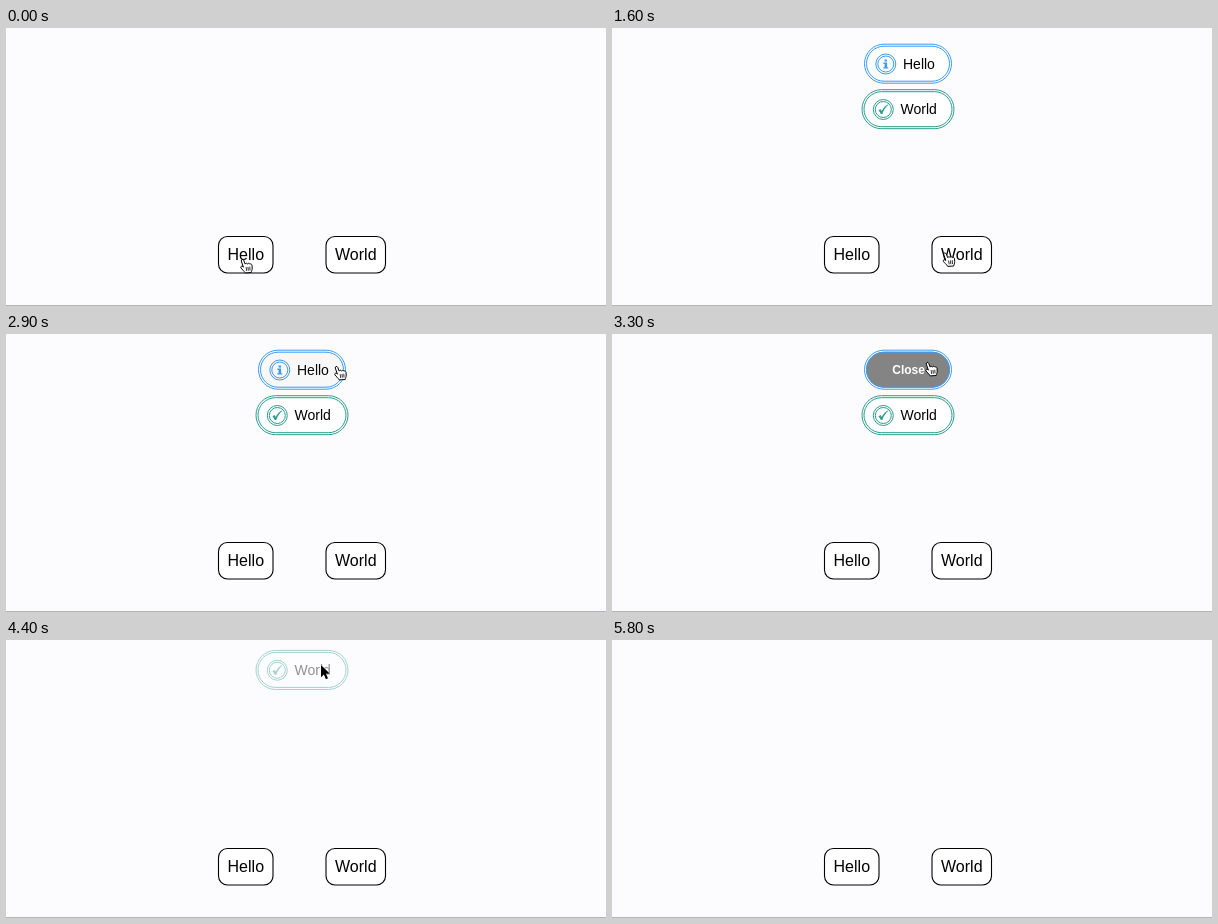
These frames come from a looping animation (600 px wide and 278 px high, 6.8 s). An HTML page:

```html
<!DOCTYPE html>
<html lang="en">
<head>
<meta charset="utf-8">
<title>Toast messages</title>
<style>
  html, body { margin: 0; width: 100%; height: 100%; overflow: hidden; background: #fcfbfe; }
  svg { display: block; width: 600px; height: 278px; font-family: "Liberation Sans", Arial, sans-serif; }
</style>
</head>
<body>
<svg id="stage" viewBox="0 0 600 278">
  <rect width="600" height="278" fill="#fcfbfe"/>
  <rect y="277" width="600" height="1" fill="#b4b4b6"/>

  <g fill="#fff" stroke="#000" stroke-width="1.1">
    <rect x="212.5" y="208.5" width="54.5" height="36.5" rx="9"/>
    <rect x="320" y="208.5" width="59.5" height="36.5" rx="9"/>
  </g>
  <g font-size="16" text-anchor="middle">
    <text x="239.8" y="232.3">Hello</text>
    <text x="349.8" y="232.3">World</text>
  </g>

  <g id="toasts"></g>

  <g id="arrow">
    <path d="M0 0V12.2L2.9 9.6L4.9 14.2L7 13.3L5 8.8H8.9Z" fill="#000" stroke="#fff" stroke-width="1" stroke-linejoin="round" paint-order="stroke"/>
  </g>
  <g id="hand" stroke="#000" stroke-linecap="round" stroke-linejoin="round">
    <path transform="translate(-2.5 -.5)" fill="#fff" d="M3.2 8.2L1.3 2.6C.9 .9 3 .2 3.7 1.8L5.2 5.6C5.6 4.6 7 4.5 7.5 5.4C8.2 4.5 9.4 4.7 9.8 5.6C10.8 5 11.8 5.6 12 6.8L12.2 9.5C12.3 11.5 11.4 12.4 11.2 14L5.2 14.4C4.6 12.6 2 11.4 .9 9.3C.3 8 1.8 7 3.2 8.2Z"/>
    <path transform="translate(-2.5 -.5)" fill="none" stroke-width=".8" d="M6.2 9L6.6 12M8 8.8L8.3 11.8M9.8 8.6L10 11.6"/>
  </g>
</svg>

<script>
const LOOP = 6800, STEP = 100, FADE = 300, RISE = 10, ROW = 45.5;
const $ = id => document.getElementById(id);
const clamp = v => Math.min(1, Math.max(0, v));
const bez = (s, a, b) => 3 * (1 - s) * (1 - s) * s * a + 3 * (1 - s) * s * s * b + s * s * s;

// The CSS "ease" curve
function ease(x) {
  if (x <= 0 || x >= 1) return clamp(x);
  let lo = 0, hi = 1;
  for (let i = 0; i < 24; i++) {
    const mid = (lo + hi) / 2;
    if (bez(mid, .25, .25) < x) lo = mid; else hi = mid;
  }
  return bez(lo, .1, 1);
}
const phase = (t, start, span = FADE) => ease((t - start) / span);

const marks = {
  info: '<path d="M-1.3 -4.6H1.2V-2.4H-1.3ZM-2.4 -1.4H1.3V3.2H2.5V4.6H-2.5V3.2H-1.2V0H-2.4Z"/>',
  check: '<path d="M-4.8 .9L-3 -.6C-2.3 .1 -1.9 .7 -1.6 1.5C.2 -1.7 2 -3.7 4.6 -4.9L4.9 -4.4C2.2 -2.2 .3 1 -1 4.5L-2.5 4.6C-3.1 3 -3.8 1.8 -4.8 .9Z"/>'
};

// A double border: two thin outlines, one pixel apart
const ring = (w, h, r, inset) =>
  `<rect x="${-w / 2 + inset}" y="${-h / 2 + inset}" width="${w - 2 * inset}" height="${h - 2 * inset}" rx="${r - inset}"/>`;
const rings = (w, h, r, color) =>
  `<g fill="none" stroke="${color}">${ring(w, h, r, .5)}${ring(w, h, r, 2.5)}</g>`;

function makeToast({ text, color, mark, width }) {
  const left = -width / 2;
  const g = document.createElementNS('http://www.w3.org/2000/svg', 'g');
  g.innerHTML = `
    <g fill="#fff">${ring(width, 40, 20, 0)}</g>
    <g transform="translate(${left + 21.8} .3)" fill="${color}">
      ${rings(21, 21, 10.5, color)}${marks[mark]}
    </g>
    <text x="${left + 39}" y="5.2" font-size="14">${text}</text>
    <g class="close" opacity="0">
      <g fill="#848484">${ring(width, 40, 20, 2)}</g>
      <text x=".6" y="4.2" font-size="12" font-weight="bold" fill="#fff" text-anchor="middle">Close</text>
    </g>
    ${rings(width, 40, 20, color)}`;
  $('toasts').append(g);
  return g;
}

const toasts = [
  { text: 'Hello', color: '#3a9bf2', mark: 'info', width: 88, enter: 180, leave: 3700, hover: 2880 },
  { text: 'World', color: '#2a9d8f', mark: 'check', width: 93, enter: 1280, leave: 4300, hover: Infinity }
];
for (const toast of toasts) toast.node = makeToast(toast);

// Pointer tip: time, x, y
const path = [
  [0, 236.5, 231], [300, 236.5, 231], [400, 244, 230], [700, 304, 226],
  [900, 327, 225], [1100, 333, 224.5], [1900, 333, 224.5], [2100, 338, 190],
  [2300, 347, 130], [2500, 352, 80], [2600, 353, 62], [2700, 357, 50],
  [2800, 350, 40], [2900, 330.5, 32], [3100, 318, 29], [3500, 313, 27],
  [4200, 313, 27], [4300, 315, 25], [4400, 315, 25], [4900, 348, 19],
  [5600, 348, 19], [5700, 411, 2]
];
const handTimes = [[0, 450], [850, 2050], [2850, 4250]];

function pointerAt(t) {
  const i = path.findIndex(p => p[0] > t);
  if (i < 0) return path[path.length - 1].slice(1);
  const [t0, x0, y0] = path[i - 1], [t1, x1, y1] = path[i];
  const k = (t - t0) / (t1 - t0);
  return [x0 + (x1 - x0) * k, y0 + (y1 - y0) * k];
}

function draw(t) {
  toasts.forEach(({ node, enter, leave, hover }, i) => {
    const shown = phase(t, enter) * (1 - phase(t, leave));
    const row = i * ROW * (1 - phase(t, 3830));
    node.setAttribute('transform', `translate(296 ${35.7 + row - RISE * (1 - shown)})`);
    node.setAttribute('opacity', shown);
    node.querySelector('.close').setAttribute('opacity', phase(t, hover));
  });

  const [x, y] = pointerAt(t);
  const isHand = handTimes.some(([a, b]) => t >= a && t < b);
  const visible = t < 5800;
  for (const id of ['arrow', 'hand']) {
    $(id).setAttribute('transform', `translate(${x} ${y})`);
    $(id).setAttribute('display', visible && isHand === (id === 'hand') ? 'inline' : 'none');
  }
}

const start = performance.now();
function tick() {
  const t = (performance.now() - start) % LOOP;
  draw(Math.floor(t / STEP) * STEP);
  requestAnimationFrame(tick);
}
tick();
</script>
</body>
</html>
```
